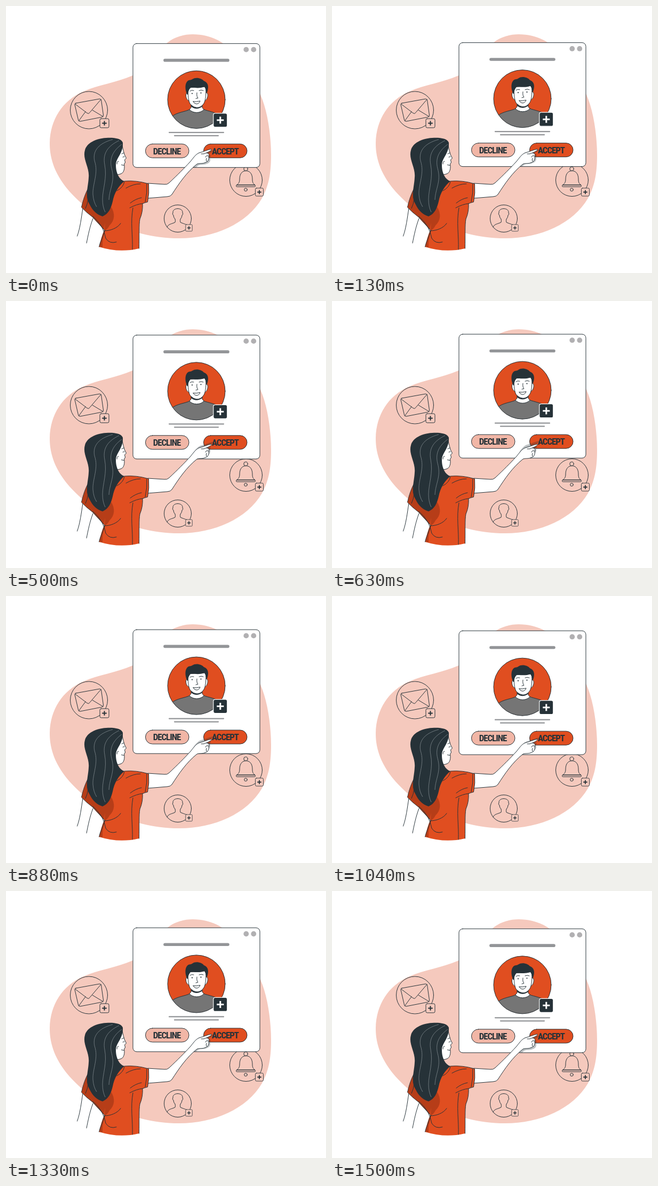
Write an HTML page that moves like this. It is 600 px wide and 500 px high and loops after 1.54 s.

```html
<!DOCTYPE html>
<html lang="en">
<head>
<meta charset="utf-8">
<title>Friend request</title>
<style>
  html, body { margin: 0; width: 100%; height: 100%; overflow: hidden; background: #fff; }
  svg { display: block; width: 100%; height: 100%; }
  .ln { fill: none; stroke: #263238; stroke-width: 1; stroke-linecap: round; stroke-linejoin: round; }
  .skin { fill: #fff; }
  .ink { fill: #263238; }
  .red { fill: #e04e20; }
  .shade { fill: #b63d18; }
  .pink { fill: #f5c9bd; }
  .strand { fill: none; stroke: #8d969a; stroke-width: .7; }
  .bar { fill: none; stroke: #939598; stroke-linecap: round; }
  text { font: bold 17px "Roboto Condensed", Roboto, sans-serif; font-stretch: condensed; letter-spacing: -1.1px; text-anchor: middle; fill: #263238; }
</style>
</head>
<body>
<svg viewBox="0 0 600 500">
  <defs>
    <clipPath id="portrait"><circle cx="357" cy="176" r="54"/></clipPath>
    <clipPath id="nearHand"><path d="M352,250H420V303H352Z"/></clipPath>
    <path id="arm" d="M266,332 L297,334 Q302,335 306,331 C322,316 334,304 345,292 C352,284 355,278 362,275 C370,273 378,269 385,268 C387,269 383,272 376,275 C382,276 381,280 380,283 C381,288 378,292 374,293 C368,296 363,294 358,296 C338,312 324,333 311,353 Q308,357 302,357 L266,360 Z"/>
    <g id="plus">
      <rect class="ln" style="fill:#f5c9bd" x="-8.5" y="-8.5" width="17" height="17" rx="2.5"/>
      <path class="ln" style="stroke-width:2;stroke-linecap:butt" d="M-4.3,0H4.3M0-4.3V4.3"/>
    </g>
  </defs>

  <path class="pink" d="M350,53 C385,53 410,68 430,90 C450,112 465,140 477,166 C490,195 497,240 497,280 C497,315 492,338 480,360 C452,408 390,435 325,435 C270,435 225,420 180,398 C130,365 82,320 82,258 C82,215 105,177 145,160 C175,147 205,144 238,130 C270,115 285,85 301,70 C316,57 335,53 350,53Z"/>

  <g class="ln">
    <circle cx="155.500" cy="195" r="35"/>
    <path d="M131,182 L175,174 Q178,174 178.500,176 L182.500,204 Q183,207 180,208 L139,216 Q136,216 135.500,213 L129,185 Q129,182 131,182Z M129.500,183.500 L152,200.500 Q155,203 157,199.500 L178,175 M136.500,215 L149,198 M182,207 L162,195"/>
    <circle cx="450" cy="326" r="30.500"/>
    <circle cx="449.500" cy="305" r="3.700"/>
    <path d="M450,308.500 C441,309 438,316 438,325 C438,331 435,333 432.500,335.500 H467 C464,333 462,331 462,325 C462,316 459,309 450,308.500Z"/>
    <rect x="431.500" y="335" width="36" height="3.500" rx="1.700"/>
    <circle cx="449.500" cy="344" r="2.800"/>
    <circle cx="322" cy="398" r="25.500"/>
    <path d="M302,414 C304,408 312,408 317,405 Q318,403 317,399 Q314,396 314,392 Q311,390 313,387 C312,377 332,377 331,387 Q333,390 330,392 Q330,396 327,399 Q326,403 327,405 C332,408 340,408 342,414"/>
  </g>
  <use href="#plus" x="184.500" y="219.500"/>
  <use href="#plus" transform="translate(475 348.500) scale(.88)"/>
  <use href="#plus" transform="translate(343 415.500) scale(.74)"/>

  <g id="panel">
    <rect class="ln" style="fill:#fff" x="238" y="71" width="238" height="232" rx="7"/>
    <g fill="#b1b0b2"><circle cx="450.300" cy="82.300" r="4.900"/><circle cx="464.300" cy="82.300" r="4.900"/></g>
    <path class="bar" stroke-width="5.600" d="M298,102.300H416"/>
    <circle class="red" cx="357" cy="176" r="54"/>
    <g clip-path="url(#portrait)">
      <path class="ln" style="fill:#757575" d="M300,240 L309,209 C320,199 337,199 345,194 C350,202 365,202 370,194 C379,198 394,199 405,208 L412,240Z"/>
      <path class="ln" style="fill:#fff" d="M347,180 V191 L344,194.500 C350,202 365,202 371,194.500 L368,191 V180Z"/>
      <path class="ink" d="M347,185 Q357,194 368,184 V189 Q357,197 347,189Z"/>
    </g>
    <g class="ln">
      <path style="fill:#fff" d="M342,163 C335,160 336,178 344,178 M374,163 C381,160 379,178 372,178"/>
      <path style="fill:#fff" d="M341,154 C341,168 342,180 346,185 Q352,191 358,191 Q366,191 371,183 C375,176 375,163 375,152Z"/>
      <path d="M345,160 Q348,157.500 352,159 M362,159 Q366,157 370,159 M358,163 Q357,170 360,173 L356,174 M351,179.500 Q357,180.500 364,178.500 Q362,184 357,184 Q353,184 351,179.500Z"/>
    </g>
    <g class="ink"><circle cx="349" cy="164.500" r="1.100"/><circle cx="365.500" cy="163.500" r="1.100"/></g>
    <path class="ink" d="M340,167 C336,160 335,148 339,143 C342,138 347,140 349,138 C356,133 367,136 371,141 C380,144 381,154 376,165 L374,156 Q373,154 372,152 C362,156 352,153 346,154 Q342,158 341,166Z"/>
    <circle class="ln" cx="357" cy="176" r="54"/>
    <rect class="ink" stroke="#fff" stroke-width="1.200" x="388.800" y="201.500" width="26" height="26" rx="3.500"/>
    <path stroke="#fff" stroke-width="3" d="M395.300,214.500H408.300M401.800,208V221"/>
    <path class="bar" stroke-width="2.200" d="M306,237.500H408M316,243.500H398"/>
    <rect class="ln" style="fill:#f1b6a6" x="261.500" y="259" width="81.500" height="26" rx="13"/>
    <rect class="ln" style="fill:#e04e20" x="370.500" y="259" width="81.500" height="26" rx="13"/>
    <text x="301.500" y="278.300">DECLINE</text>
    <text x="411" y="278.300">ACCEPT</text>
    <g clip-path="url(#nearHand)"><use href="#arm" x="3" y="3" fill="#263238" opacity=".3"/></g>
  </g>

  <use href="#arm" class="ln" style="fill:#fff"/>
  <path class="ln" d="M376,275 Q371,278 366,277 M380,281 Q375,279 374,283 M376,285 Q374,290 377,291"/>

  <path class="skin" d="M143,376 L133.500,431 L151,445 L166,396Z"/>
  <path class="ln" d="M144,379 C141,398 139,416 133.500,431 M163,398 C157,414 154,429 151,444"/>

  <path class="ln" style="fill:#fff" d="M200,275 L218,261 C219,268 221,274 222,278 L225.500,285 L222.500,288 L223.500,293 L221.500,296 C223,304 221,312 216,314 Q211,317 206,315Z"/>
  <path class="ln" d="M217,277 L221,275 M219,283 L222,282 M216.500,297.500 L221,298.500 M211,291 Q208,290 208,296"/>

  <path class="red" d="M155,340 C149,350 144,365 141.500,377 Q150,386 162,395 L185,420 C183,430 176,442 174.500,451 Q212,463 249.500,454 C250,430 249,410 251,399 Q257,385 256,370 Q261,368 265.500,367 Q269,350 267.500,333 Q244,326 222,328 L205,335Z"/>
  <path class="shade" d="M154,343 C149,352 145,365 142,376 Q150,386 162,395 L184,419 C184,408 188,402 190,394 L196,378Z M184,420 Q178,434 175,451 L181,452 Q180,437 186,421Z"/>
  <path class="shade" d="M197,376 C205,389 204,401 194,411 Q191,417 185,421 L186,395Z"/>
  <path class="ln" d="M155,340 C149,350 144,365 141.500,377 Q150,386 162,395 L185,420 C183,430 176,442 174.500,451 M249.500,454 C250,430 249,410 251,399 Q257,385 256,370 Q261,368 265.500,367 Q269,350 267.500,333 Q244,326 222,328"/>
  <path class="ln" d="M264,332.500 Q265,350 261,367 M256,370 Q245,371 232,378 M254,359 Q243,361 233,369 M225,341 Q239,333 252,333 M238,378 C233,405 238,430 237,456 M163,394 Q183,411 187,435 Q194,446 207,442 M184,421 C196,421 209,416 215,407 M149,379 Q153,371 154,361 M222,329 Q220,340 208,346"/>

  <path class="ink" d="M219,256 C217,248 202,246 188,247 C168,248 151,257 148,270 C143,287 157,302 155,321 C154,341 147,357 157,372 Q165,389 181,394 C193,389 197,378 200,366 C203,350 211,337 222,328 C212,325 206,312 206,298 C206,284 220,277 219,256Z"/>
  <path class="strand" d="M212,252 C191,262 181,276 185,297 C190,322 181,343 181,362 Q181,376 186,386 M200,250 C174,257 162,271 166,290 C174,313 162,333 163,353 Q164,367 170,376 M217,259 C202,270 193,284 198,304 C205,329 194,341 193,363"/>
</svg>
<script>
  const panel = document.getElementById("panel");
  const PERIOD = 1540, LEAD = 50, RISE = 10;

  // Linear float: up for half the loop, down for the other half.
  function frame(now) {
    const phase = ((now + LEAD) % PERIOD) / PERIOD;
    const lift = RISE * (1 - Math.abs(1 - 2 * phase));
    panel.setAttribute("transform", `translate(0 ${-lift})`);
    requestAnimationFrame(frame);
  }
  requestAnimationFrame(frame);
</script>
</body>
</html>
```
